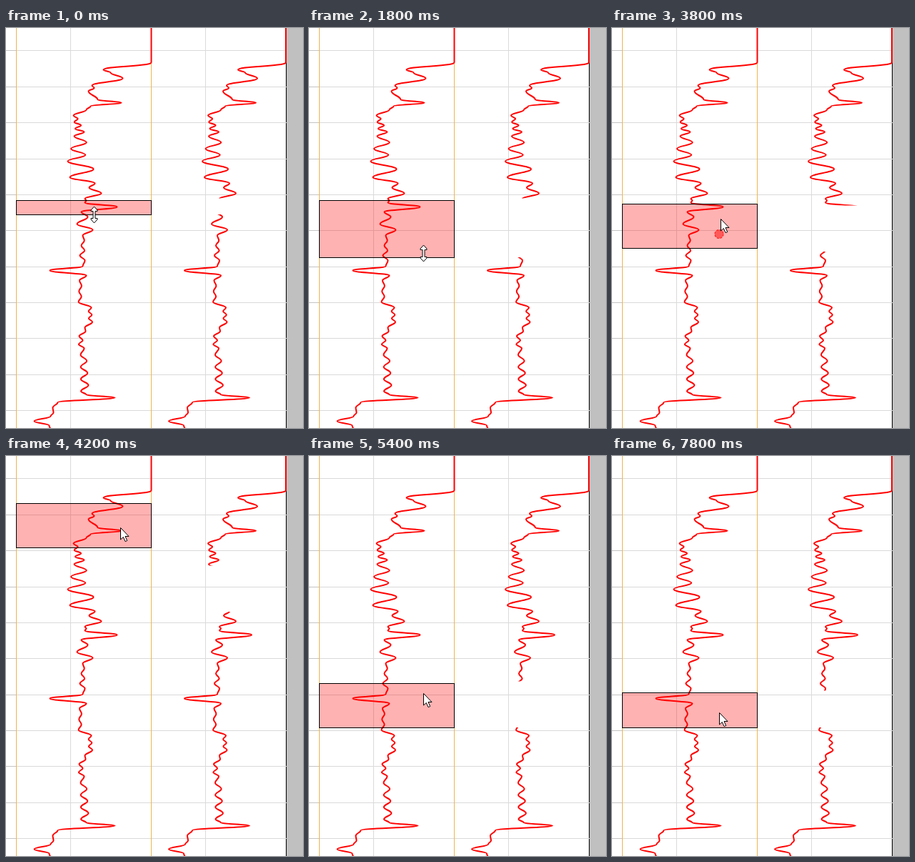
These frames come from a looping animation (416x560 px, 8 s). An HTML page with a canvas:

```html
<!DOCTYPE html>
<html lang="en">
<head>
<meta charset="utf-8">
<title>Curve section selection</title>
<style>
  html, body { margin: 0; width: 100%; height: 100%; overflow: hidden; background: #fff; }
  canvas { display: block; }
</style>
</head>
<body>
<canvas id="stage" width="416" height="560"></canvas>
<script>
const W = 416, H = 560, STEP = 200, LOOP = 8000;
const BOX_X = 14, BOX_W = 189, MOVE_H = 62;
const ctx = document.getElementById('stage').getContext('2d');

const mix = (a, b, p) => a + (b - a) * p;

// Tracks hold [step, value] points
const tracks = {
  top: [[12, 241], [14, 120], [18, 251], [19, 246], [21, 66], [22, 201], [23, 219],
    [24, 323], [25, 318], [28, 318], [30, 296], [34, 331]],
  bottom: [[0, 261], [1, 246], [6, 438], [9, 321], [10, 313]],
  x: [[0, 123], [9, 160], [15, 162], [19, 152], [23, 168], [27, 160], [39, 150]],
  y: [[0, 261], [1, 231], [6, 438], [9, 315], [12, 238], [14, 110], [15, 191], [18, 287],
    [19, 267], [21, 100], [23, 293], [24, 345], [27, 332], [30, 305], [34, 331], [39, 359]]
};

function at(name, step) {
  const track = tracks[name];
  const i = track.findIndex(k => k[0] >= step);
  if (i < 0) return track[track.length - 1][1];
  if (i === 0) return track[0][1];
  const [[s0, v0], [s1, v1]] = [track[i - 1], track[i]];
  return Math.round(mix(v0, v1, (step - s0) / (s1 - s0)));
}

// From step 18 the box moves as a whole, from step 28 only its top edge does
const boxAt = step => ({
  top: at('top', step),
  bottom: step <= 18 ? at('bottom', step) : at('top', Math.min(step, 28)) + MOVE_H
});

// Turning points that swing left and right of a drifting middle
function swing(n, y0, y1, mid0, mid1, amp0, amp1, side = -1) {
  return Array.from({ length: n }, (_, i) => {
    const p = i / (n - 1);
    const sign = i % 2 ? -side : side;
    return [mix(mid0, mid1, p) + sign * mix(amp0, amp1, p), mix(y0, y1, p)];
  });
}

const turns = [
  [136, 58], [146, 62], [163, 70], [120, 80], [123, 83.5], [115, 88],
  [128, 100], [161, 104], [118, 109], [112, 114],
  ...swing(6, 122, 145, 96, 103, 2, 6),
  ...swing(5, 151, 186, 104, 98, 9, 12),
  [122, 197], [89, 208.5], [124, 217], [116, 223], [133, 231],
  [110, 238.5], [112, 241], [110, 244], [155, 250],
  [105, 257], [114, 264], [99, 274], [121, 282],
  ...swing(6, 290, 325, 108, 106, 1, 4),
  [107, 333], [61, 339], [112, 346],
  ...swing(5, 353, 383, 104, 103, 1.5, 2),
  ...swing(5, 391, 411, 117, 118, 2, 2.5, 1),
  [110, 419], [111, 424],
  ...swing(4, 431, 448, 104, 105, 2, 4),
  ...swing(7, 457, 508, 108, 110, 4, 5.5),
  [112, 513], [152, 517], [72, 523.5], [65, 531], [66, 538], [62, 543],
  [39, 550], [60, 556], [62, 562]
];

const curve = new Path2D('M203 -5V47.5Q203 49.5 196 50.5C176 53.5 136 54 136 58');
turns.slice(1).forEach(([x, y], i) => {
  const [x0, y0] = turns[i];
  const bend = (y - y0) * 0.42;
  curve.bezierCurveTo(x0, y0 + bend, x, y - bend, x, y);
});

const arrow = new Path2D('M0 0V16.5L3.8 13L6.6 19.2L9.2 18L6.5 12H11.5Z');
const resize = new Path2D(
  'M0 -11.5L4.5 -6.5V-5H1.5V5H4.5V6.5L0 11.5L-4.5 6.5V5H-1.5V-5H-4.5V-6.5Z');

function rect(x, y, w, h, color) {
  ctx.fillStyle = color;
  ctx.fillRect(x, y, w, h);
}

function drawGrid() {
  const column = (x, color) => rect(x, 0, 1, H, color);
  rect(0, 0, W, H, '#fff');
  rect(393, 0, W - 393, H, '#c0c0c0');
  column(392, '#000');
  column(90, '#dadada');
  column(279, '#dadada');
  for (let i = 0; i < 11; i++) {
    const y = Math.round(31.4 + i * 50.37);
    rect(0, y, 393, 1, '#dadada');
    rect(0, y, BOX_X, 1, '#c4c4c4');
  }
  column(BOX_X, '#eeb44f');
  column(BOX_X + BOX_W, '#eeb44f');
}

function drawCurve(shift = 0) {
  ctx.save();
  ctx.translate(shift + 0.5, 0.5);
  ctx.strokeStyle = '#f00';
  ctx.lineWidth = 2;
  ctx.lineJoin = 'round';
  ctx.stroke(curve);
  ctx.restore();
}

function drawTrimmed({ top, bottom }) {
  ctx.save();
  ctx.beginPath();
  ctx.rect(204, 0, BOX_W, top - 2.5);
  ctx.rect(204, bottom, BOX_W, H - bottom);
  ctx.clip();
  drawCurve(188.5);
  ctx.restore();
}

function drawBox({ top, bottom }) {
  const frame = [BOX_X + 0.5, top + 0.5, BOX_W, bottom - top];
  rect(...frame, 'rgba(255,0,0,.3)');
  ctx.strokeStyle = '#000';
  ctx.lineWidth = 1;
  ctx.strokeRect(...frame);
}

function drawPress(x, y) {
  ctx.save();
  ctx.beginPath();
  ctx.arc(x, y, 6, 0, Math.PI * 2);
  ctx.fillStyle = 'rgba(255,0,0,.5)';
  ctx.fill();
  ctx.setLineDash([3, 1.7]);
  ctx.strokeStyle = '#f22';
  ctx.lineWidth = 1.2;
  ctx.stroke();
  ctx.restore();
}

function drawPointer(shape, x, y) {
  ctx.save();
  ctx.translate(x + 0.5, y + 0.5);
  ctx.fillStyle = '#fff';
  ctx.strokeStyle = '#000';
  ctx.lineWidth = 1;
  ctx.fill(shape);
  ctx.stroke(shape);
  ctx.restore();
}

function draw(step) {
  // The trimmed copy trails the box while it is being moved
  const moving = step > 18 && step < 24;
  const resizing = step < 18 || (step > 27 && step < 35);

  drawGrid();
  drawCurve();
  drawTrimmed(boxAt(moving ? step - 1 : step));
  drawBox(boxAt(step));
  if (step === 19) drawPress(150, 288.5);
  drawPointer(resizing ? resize : arrow, at('x', step), at('y', step));
}

const start = performance.now();
function tick() {
  draw(Math.floor(((performance.now() - start) % LOOP) / STEP));
  requestAnimationFrame(tick);
}
tick();
</script>
</body>
</html>
```
